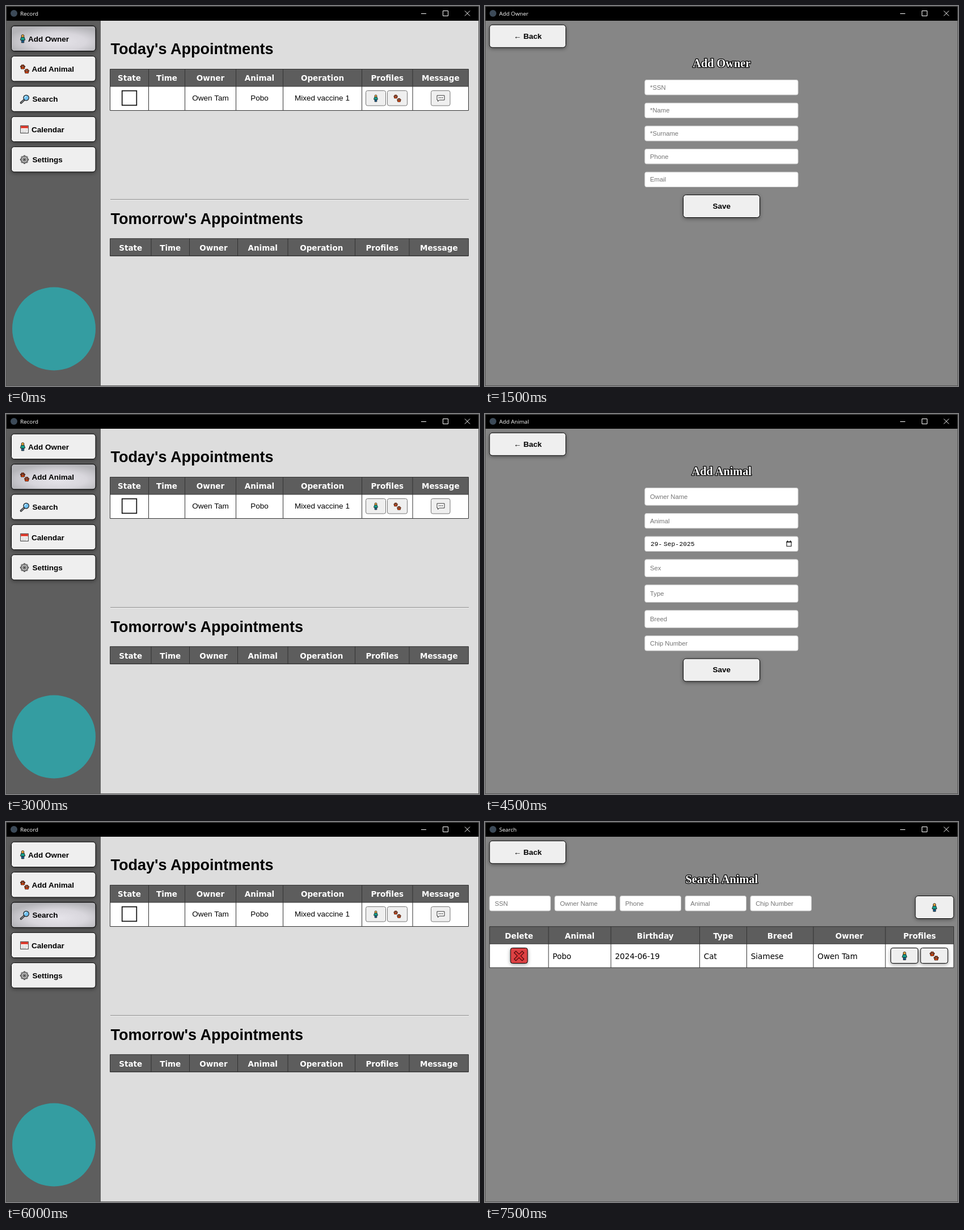
These frames come from a looping animation (834 px wide and 671 px high, 8 s). An HTML page:

```html
<!DOCTYPE html>
<html lang="en">
<head>
<meta charset="utf-8">
<title>Clinic record</title>
<style>
  html, body { margin: 0; width: 100%; height: 100%; overflow: hidden; background: #000; }
  svg { display: block; width: 834px; height: 671px; }
  text { font: 13.5px "Liberation Sans", Arial, sans-serif; }
  .mid { text-anchor: middle; }
  .bold { font-weight: 700; }
  .caption { font: 9.8px "Open Sans", sans-serif; fill: #fff; }
  .heading { font-size: 27px; font-weight: 700; }
  .th { font: 700 13.5px "DejaVu Sans", sans-serif; fill: #fff; text-anchor: middle; }
  .td { font: 13.6px "DejaVu Sans", sans-serif; }
  .hint { font-size: 11.27px; fill: #757575; }
  .date { font: 11.27px "Liberation Mono", monospace; }
  .title { font: 700 20.3px "Liberation Serif", serif; fill: #fff; stroke: #000; stroke-width: 2.6px;
    stroke-linejoin: round; paint-order: stroke; text-anchor: middle; }
  .button { fill: #efefef; stroke: #000; filter: drop-shadow(0 2px 3px rgba(0,0,0,.38)); }
  .small { fill: #efefef; stroke: #767676; }
  .field { fill: #fff; stroke: #ccc; }
  .line { fill: none; stroke: #333; }
  .slot { opacity: 0; animation: slot 8s step-end infinite; animation-delay: calc(var(--i) * 1.5s - 8s); }
  .last { opacity: 0; animation: last 8s step-end infinite; }
  @keyframes slot { 0% { opacity: 1 } 18.75%, 100% { opacity: 0 } }
  @keyframes last { 0% { opacity: 0 } 93.75%, 100% { opacity: 1 } }
</style>
</head>
<body>
<svg id="stage" viewBox="0 0 834 671"></svg>
<script>
const OWNER = 'Owen Tam', PET = 'Pobo';

const rect = (x, y, w, h, attrs) => `<rect x="${x}" y="${y}" width="${w}" height="${h}" ${attrs}/>`;
const text = (x, y, str, cls = '') => `<text x="${x}" y="${y}" class="${cls}">${str}</text>`;
const icon = (id, x, y, scale = 1) =>
  `<use href="#${id}" transform="translate(${x} ${y}) scale(${scale})"/>`;
const button = (x, y, w, h, r = 5) => rect(x, y, w, h, `rx="${r}" class="button"`);
const small = (x, w) => rect(x, 149.5, w, 26.5, 'rx="3" class="small"');

const paw = (x, y) => `<g transform="translate(${x} ${y})">
  <path d="M-3.4 2.6Q-3.2 .1 0 -.3Q3.2 .1 3.4 2.6Q2.7 4.2 0 3.3Q-2.7 4.2-3.4 2.6Z"/>
  ${[[-3.1, -.6], [-1.2, -2.6], [1.2, -2.6], [3.1, -.6]]
    .map(([cx, cy]) => `<ellipse cx="${cx}" cy="${cy}" rx="1" ry="1.3"/>`).join('')}</g>`;

const gearTeeth = Array.from({ length: 8 }, (_, i) =>
  `<rect x="-1.5" y="-7.2" width="3" height="4" rx=".6" transform="rotate(${i * 45})"/>`).join('');

const defs = `<defs>
  <radialGradient id="pressed" cx=".55" cy=".62" r=".62">
    <stop offset="0" stop-color="#e6e4ea"/><stop offset=".55" stop-color="#d8d6dc"/>
    <stop offset="1" stop-color="#b4b4b8"/>
  </radialGradient>
  <g id="person" stroke="#1c1c1c" stroke-width=".9" stroke-linejoin="round">
    <path d="M-2.2 1H2.2V7H-2.2Z" fill="#1878b8"/>
    <path d="M-2.6-2.8H2.6L4.2 2.2L2.4 2.8H-2.4L-4.2 2.2Z" fill="#16a08c"/>
    <circle cy="-4.8" r="2.4" fill="#f0a83c"/>
    <path d="M0 3V7" stroke-width=".7"/>
  </g>
  <g id="paws" fill="#e2480c" stroke="#2a0d04" stroke-width=".9">${paw(-3.5, -3.6)}${paw(3.6, 4)}</g>
  <g id="search">
    <path d="M-1.5 1.7L-6.5 6.4" stroke="#222" stroke-width="3.6" stroke-linecap="round"/>
    <path d="M-1.7 1.9L-6.3 6.2" stroke="#8a8f96" stroke-width="1.5" stroke-linecap="round"/>
    <circle cx="2.6" cy="-2.4" r="4.8" fill="#6fc0f0" stroke="#222" stroke-width="1.2"/>
    <path d="M-.2-2.2Q.2-4.8 2.6-5.2" fill="none" stroke="#d5efff" stroke-width="1.2"/>
  </g>
  <g id="calendar">
    ${rect(-6.8, -6.5, 13.6, 13, 'fill="#fff" stroke="#333"')}
    ${rect(-6.3, -6, 12.6, 4, 'fill="#e03a2c"')}
    <path d="M-4.5 .5H5M-4.5 3H5M-4.5 5H2" stroke="#999" stroke-dasharray="1.5 1"/>
  </g>
  <g id="gear">
    <g fill="#aaa" stroke="#333" stroke-width=".9">${gearTeeth}<circle r="5.6"/></g>
    <circle r="4.8" fill="#c4c4c4"/><circle r="2.8" fill="#aaa" stroke="#444" stroke-width=".8"/>
    <circle r="1.2" fill="#222"/>
  </g>
  <g id="bubble">
    <path d="M-6.5-5H6.5V3H-2.5L-5 5.5V3H-6.5Z" fill="#fff" stroke="#333" stroke-linejoin="round"/>
    <path d="M-3.6-1H4" stroke="#222" stroke-width="1.6" stroke-dasharray="1.6 1.3"/>
  </g>
</defs>`;

function frame(caption, background) {
  return rect(0, 0, 834, 671, `fill="${background}"`) + rect(0, 0, 834, 26, 'fill="#000"') +
    '<circle cx="14" cy="13" r="6" fill="#3c4a58"/>' + text(25, 17, caption, 'caption') +
    '<path d="M732 13.5H741M770.5 8.5H779.5V17.5H770.5ZM809 8.5L818 17.5M818 8.5L809 17.5" fill="none" stroke="#fff"/>';
}

const border = rect(.5, .5, 833, 670, 'fill="none" stroke="#555"');

function table(edges, labels, top, rowHeight = 0) {
  const left = edges[0], width = edges.at(-1) - left, bottom = top + 30.5 + rowHeight;
  const rules = edges.map(x => `M${x} ${top}V${bottom}`).join('');
  return rect(left, top, width, 30.5, 'fill="#5d5d5d"') +
    (rowHeight ? rect(left, top + 30.5, width, rowHeight, 'fill="#fff"') : '') +
    `<path class="line" d="${rules}M${left} ${top}H${left + width}M${left} ${top + 30.5}H${left + width}M${left} ${bottom}H${left + width}"/>` +
    labels.map((label, i) => text((edges[i] + edges[i + 1]) / 2, top + 20.8, label, 'th')).join('');
}

function home() {
  const items = [
    ['Add Owner', 'person', 29.5, 39], ['Add Animal', 'paws', 33, 45.5], ['Search', 'search', 33, 46.5],
    ['Calendar', 'calendar', 32.5, 45], ['Settings', 'gear', 32.5, 46.5],
  ];
  const menu = items.map(([label, id, iconX, textX], i) => {
    const y = 35.2 + i * 53.35;
    const pressed = i < 3
      ? rect(9.5, y, 148.5, 44.4, `rx="5" fill="url(#pressed)" stroke="#000" class="slot" style="--i:${i * 2}"`) : '';
    return button(9.5, y, 148.5, 44.4) + pressed + icon(id, iconX, y + 22.6) + text(textX, y + 27.4, label, 'bold');
  }).join('');
  const labels = ['State', 'Time', 'Owner', 'Animal', 'Operation', 'Profiles', 'Message'];
  return frame('Record', '#ddd') + rect(0, 26, 167, 645, 'fill="#5e5e5e"') + menu +
    '<circle cx="84.5" cy="570" r="73.5" fill="#349da1"/>' +
    text(184.5, 85, "Today's Appointments", 'heading') +
    table([183.5, 251.5, 315.5, 405.5, 488.5, 627.5, 717, 815.5], labels, 111.5, 42.5) +
    rect(204.7, 149.7, 25.6, 25.6, 'fill="#fff" stroke="#111" stroke-width="1.7"') +
    text(360.5, 167, OWNER, 'mid') + text(447, 167, PET, 'mid') + text(557.5, 167, 'Mixed vaccine 1', 'mid') +
    small(634.5, 35) + small(672.5, 35) + small(749.5, 33.5) +
    icon('person', 652, 163, .85) + icon('paws', 690, 163, .82) + icon('bubble', 766.5, 163) +
    '<path d="M184 341.5H816" stroke="#8c8c8c"/><path d="M184 342.5H816" stroke="#eee"/>' +
    text(184.5, 385, "Tomorrow's Appointments", 'heading') +
    table([183.5, 256, 323.5, 408.5, 497, 615.5, 711, 815.5], labels, 410.7);
}

const page = (caption, title) => frame(caption, '#868686') + button(8, 33.3, 134.5, 40) +
  text(75.3, 57.6, '← Back', 'mid bold') + text(417.3, 108.3, title, 'title');

const field = (x, y, w, h, hint) =>
  rect(x, y, w, h, 'rx="3" class="field"') + text(x + 9.2, y + h / 2 + 3.8, hint, 'hint');

// Tall fields are marked with a trailing "+".
function form(title, hints) {
  let y = 130.6, out = page(title, title);
  for (const hint of hints) {
    const h = hint.endsWith('+') ? 30.6 : 26.3;
    out += field(281.8, y, 270.2, h, hint.replace('+', ''));
    y += h + 14.35;
  }
  return out + button(349.5, y - .3, 135, 40) + text(417.2, y + 24, 'Save', 'mid bold');
}

const date = text(292, 232.6, '29-<tspan x="315">Sep-</tspan><tspan x="342.5">2025</tspan>', 'date') +
  '<path d="M532 225.5H540V233.5H532Z" fill="none" stroke="#111" stroke-width="1.1"/>' +
  '<path d="M531.5 226H540.5M533.5 223.5V226M538.5 223.5V226" stroke="#111" stroke-width="1.6"/>';

function search() {
  const edges = [8, 112, 222, 378.5, 461.5, 579, 706, 826.5];
  const cells = [PET, '2024-06-19', 'Cat', 'Siamese', OWNER];
  const cross = 'M54.5 231L65.5 242M65.5 231L54.5 242';
  return page('Search', 'Search Animal') +
    ['SSN', 'Owner Name', 'Phone', 'Animal', 'Chip Number']
      .map((hint, i) => field(8 + i * 115, 130.6, 107.5, 26.3, hint)).join('') +
    button(758.8, 130.5, 67.5, 40) + icon('person', 792.5, 151) +
    table(edges, ['Delete', 'Animal', 'Birthday', 'Type', 'Breed', 'Owner', 'Profiles'], 184.7, 42) +
    cells.map((cell, i) => text(edges[i + 1] + 7.2, 241.5, cell, 'td')).join('') +
    rect(45, 222.5, 30, 27, 'rx="3.5" class="button" style="fill:#dd4244"') +
    `<path d="${cross}" stroke="#40080a" stroke-width="5.4" stroke-linecap="square"/>` +
    `<path d="${cross}" stroke="#dc3436" stroke-width="3.2" stroke-linecap="square"/>` +
    button(715.5, 222.5, 48, 27, 3.5) + button(768, 222.5, 48, 27, 3.5) +
    icon('person', 739.7, 236.5) + icon('paws', 792, 236.5);
}

document.getElementById('stage').innerHTML = defs + home() +
  `<g class="slot" style="--i:1">${form('Add Owner', ['*SSN', '*Name', '*Surname', 'Phone', 'Email'])}</g>` +
  `<g class="slot" style="--i:3">${form('Add Animal',
    ['Owner Name+', 'Animal', '', 'Sex+', 'Type+', 'Breed+', 'Chip Number'])}${date}</g>` +
  `<g class="last">${search()}</g>` + border;
</script>
</body>
</html>
```
